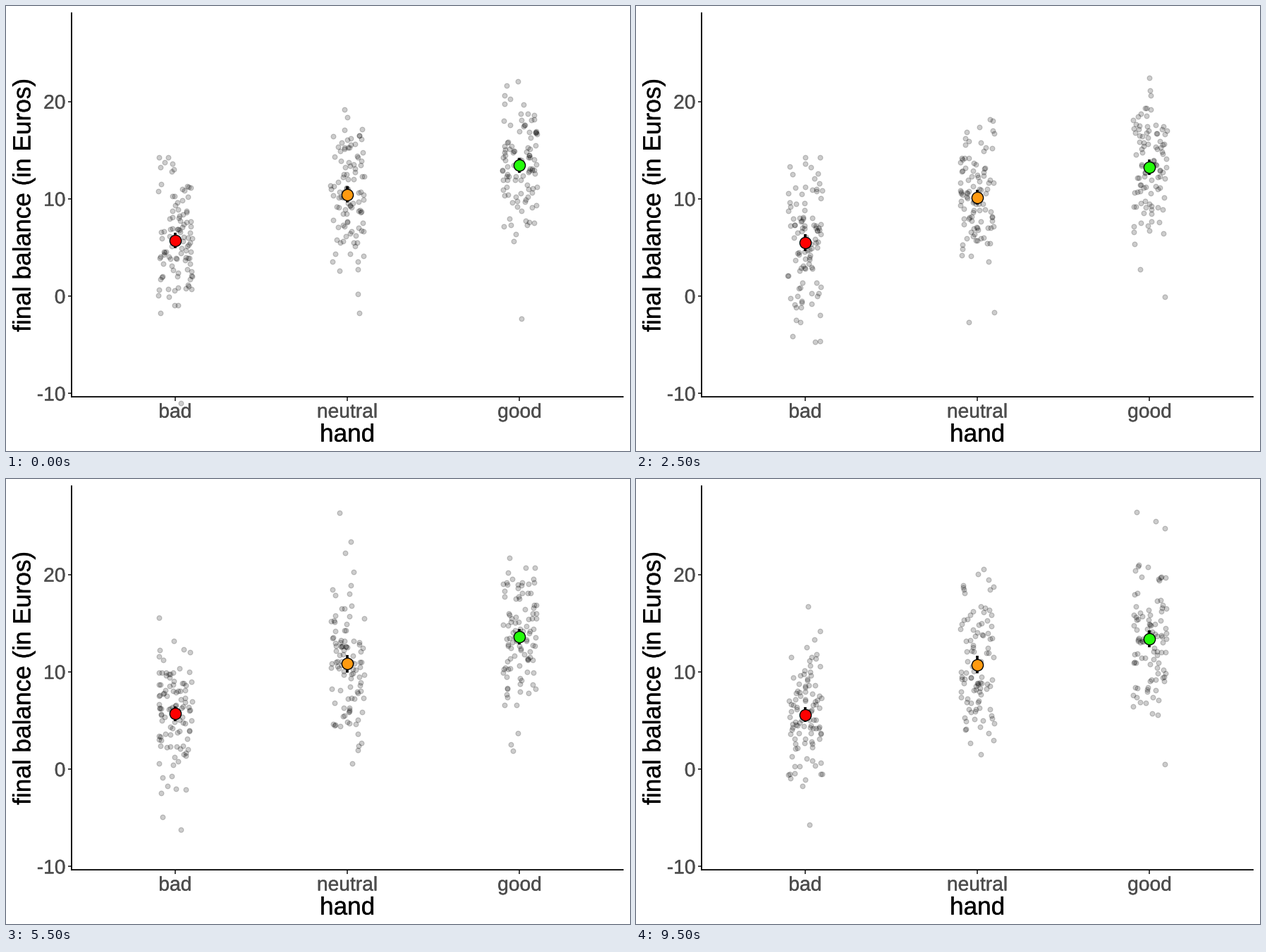
A matplotlib script for the animation above (10000 ms loop, 885 px wide and 632 px high).

```python
import numpy as np
import matplotlib.pyplot as plt
from matplotlib.animation import FuncAnimation
from matplotlib.patheffects import withStroke

WIDTH, HEIGHT, DPI = 885, 632, 64
PX = 72 / DPI  # points per pixel
N_FRAMES, INTERVAL = 20, 500

HANDS = ["bad", "neutral", "good"]
COLORS = ["#ff0000", "#ff9a10", "#24fb0a"]
MEANS = [5.7, 10.5, 13.3]
N_POINTS, SPREAD, DRIFT, JITTER = 100, 4.2, 0.25, 0.1

LEFT, RIGHT, TOP, BOTTOM = 93.3, 875, 10, 554.5
ZERO, EURO = 412.2, 13.82  # stage height of zero, pixels per euro
FIRST, STEP = 239.8, 244.3  # stage position of the hands

plt.rcParams["font.family"] = "Liberation Sans"
fig = plt.figure(figsize=(WIDTH / DPI, HEIGHT / DPI), dpi=DPI, facecolor="white")
ax = fig.add_axes([LEFT / WIDTH, 1 - BOTTOM / HEIGHT,
                   (RIGHT - LEFT) / WIDTH, (BOTTOM - TOP) / HEIGHT])
ax.set_xlim(0.4, 3.6)
ax.set_ylim((ZERO - BOTTOM) / EURO, (ZERO - TOP) / EURO)
ax.set_xticks([1, 2, 3], [""] * 3)
ax.set_yticks(range(-10, 30, 10), [""] * 4)
ax.tick_params(length=5.5 * PX, width=1.8 * PX, color="#333333")
ax.spines[["top", "right"]].set_visible(False)
ax.spines[["left", "bottom"]].set_linewidth(1.8 * PX)


def label(x, y, text, size, color="black", ha="center", rotation=0):
    """Slightly heavy text with its baseline at stage pixel (x, y)."""
    fig.text(x / WIDTH, 1 - y / HEIGHT, text, fontsize=size * PX, color=color,
             ha=ha, va="baseline", rotation=rotation, rotation_mode="anchor",
             path_effects=[withStroke(linewidth=0.35 * PX, foreground=color)])


def tick_label(x, y, text, ha="center"):
    label(x, y, text, 28.2, "#4d4d4d", ha)


for i, hand in enumerate(HANDS):
    tick_label(FIRST + STEP * i, 584.5, hand)
for value in range(-10, 30, 10):
    tick_label(84.5, ZERO - EURO * value + 10, str(value), "right")
label(484.2, 618.5, "hand", 35.2)
label(34.5, 282.5, "final balance (in Euros)", 35.2, rotation=90)

FAINT = (0, 0, 0, 0.2)
points, = ax.plot([], [], "o", ms=6.8 * PX, mfc=FAINT, mec=FAINT,
                  mew=1.2 * PX, clip_on=False)
bars = [ax.plot([], [], color="black", lw=3.6 * PX, solid_capstyle="butt",
                zorder=3)[0] for _ in HANDS]
dots = [ax.plot([], [], "o", ms=16.2 * PX, mfc=color, mec="black",
                mew=1.4 * PX, zorder=4)[0] for color in COLORS]


def simulate(seed):
    """One experiment: scatter positions, balances and mean of each hand."""
    rng = np.random.default_rng(seed)
    means = rng.normal(MEANS, DRIFT)
    x = np.arange(1, 4) + rng.uniform(-JITTER, JITTER, (N_POINTS, 3))
    y = rng.normal(0, SPREAD, (N_POINTS, 3))
    return x, y - y.mean(axis=0) + means, means


def update(frame):
    x, y, means = simulate(frame)
    points.set_data(x.ravel(), y.ravel())
    errors = 1.96 * y.std(axis=0) / np.sqrt(N_POINTS)
    for hand, (bar, dot, mean, err) in enumerate(zip(bars, dots, means, errors), 1):
        bar.set_data([hand, hand], [mean - err, mean + err])
        dot.set_data([hand], [mean])
    return [points, *bars, *dots]


anim = FuncAnimation(fig, update, frames=N_FRAMES, interval=INTERVAL,
                     repeat=True, repeat_delay=0)
plt.show()
```
